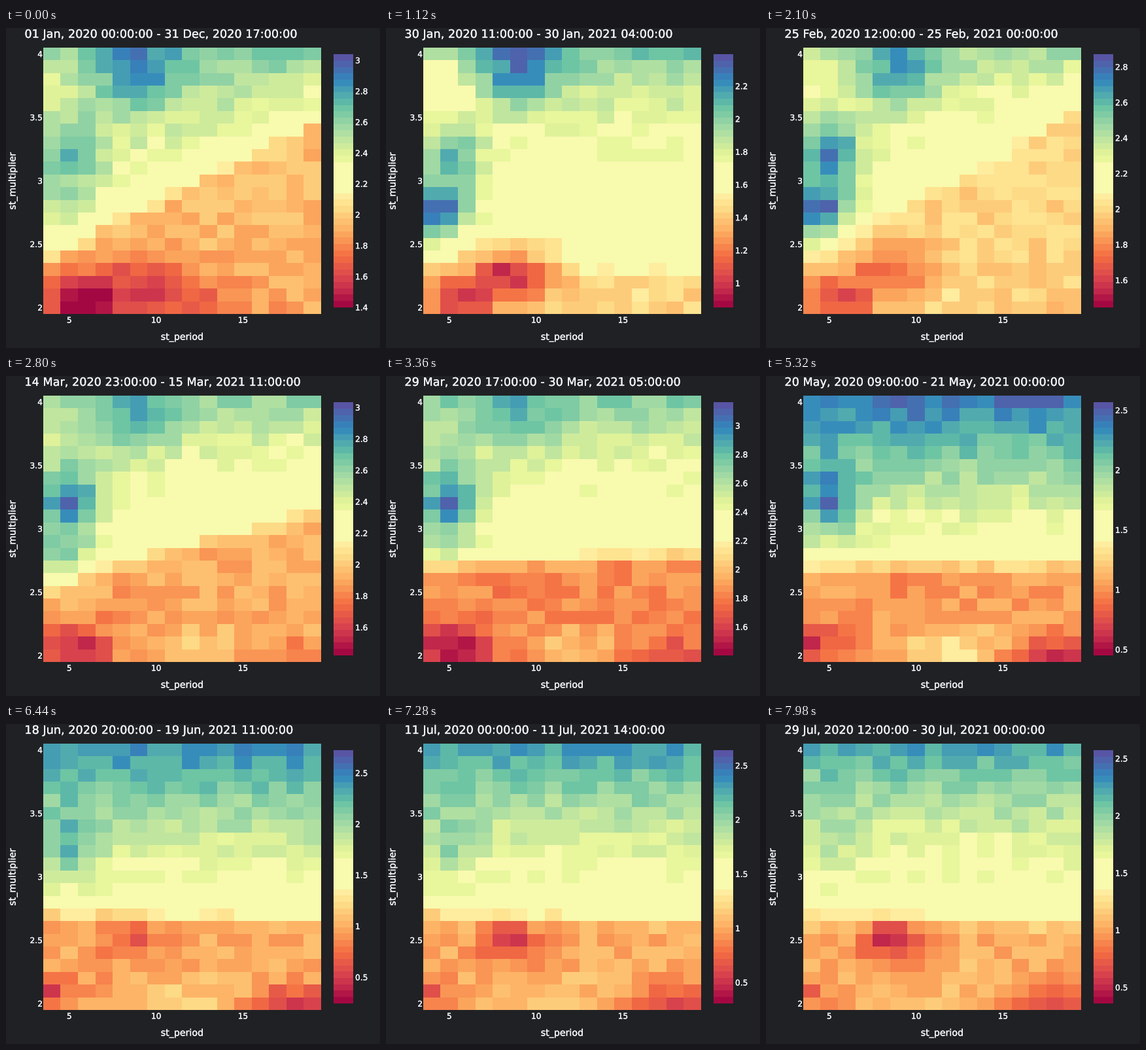
Animation of 572 by 489 pixels, one loop 8 s. Source, as a matplotlib script:

```python
import numpy as np
import matplotlib.pyplot as plt
from matplotlib.animation import FuncAnimation
from matplotlib.colors import ListedColormap
from matplotlib.patheffects import withStroke

W, H, DPI = 572, 489, 64
TICK, STEP_TICKS, FRAMES = 20, 7, 400   # a new window every 140 ms
BG, INK = '#202124', '#f2f5fa'
MONTHS = 'Jan Feb Mar Apr May Jun Jul Aug Sep Oct Nov Dec'.split()
plt.rcParams['font.family'] = 'DejaVu Sans'

# Key windows: first hour, last hour and colour range
STEPS = [0, 8, 15, 24, 38, 46, 57]
STARTS = ['2020-01-01T00', '2020-01-30T11', '2020-02-25T12', '2020-03-29T17',
          '2020-05-20T09', '2020-06-18T20', '2020-07-29T12']
ENDS = ['2020-12-31T17', '2021-01-30T04', '2021-02-25T00', '2021-03-30T05',
        '2021-05-21T00', '2021-06-19T11', '2021-07-30T00']
LOWS = [1.40, .853, 1.447, 1.402, .451, .244, .36]
HIGHS = [3.04, 2.395, 2.872, 3.164, 2.568, 2.724, 2.574]

# The front between gains (above) and losses (below)
FRONT_LEFT = [2.45, 2.4, 2.45, 2.75, 2.75, 2.75, 2.75]
FRONT_RIGHT = [3.5, 2.3, 3.55, 2.85, 2.75, 2.7, 2.65]
GAIN = [.26, .27, .2, .25, .42, .38, .34]
BEND = [1, 3, 1.5, 2, 1.2, 1.3, 1.5]
LOSS = [.17, .09, .12, .26, .22, .2, .19]

P, M = np.meshgrid(np.arange(4, 20), np.linspace(4, 2, 21))
rng = np.random.default_rng(12)
PHASE = rng.uniform(0, 2 * np.pi, P.shape)
DRIFT = rng.normal(0, .12, P.shape)


def at(step, values):
    return np.interp(step, STEPS, values)


def bell(x, centre, width):
    return np.exp(-((x - centre) / width) ** 2)


def bump(p, m, wide, tall, amp, peak, span):
    """A hill or hollow on the map that swells and fades around one step."""
    shape = amp * bell(P, p, wide) * bell(M, m, tall)
    return lambda step: shape * bell(step, peak, span)


BUMPS = [
    bump(9, 3.85, 2.2, .28, .22, 7, 20),
    bump(4, 3.75, 2.5, .35, -.2, 8, 10),
    bump(5, 3.2, 1.8, .3, .4, 23, 28),
    bump(4.5, 2.75, 1.7, .2, .48, 11, 9),
    bump(8.5, 2.3, 2.5, .22, -.33, 9, 8),
    bump(8.5, 2.5, 1.8, .18, -.22, 57, 15),
    bump(5.5, 2.05, 2, .18, -.28, 8, 25),
    bump(4, 2.1, 1, .14, -.2, 40, 22),
    bump(10, 2.05, 5, .25, -.2, 0, 6),
    bump(12, 2.05, 2.5, .18, .17, 32, 14),
    bump(18, 2, 2.2, .14, -.22, 57, 40),
]


def field(step):
    left, right = at(step, FRONT_LEFT), at(step, FRONT_RIGHT)
    front = left + (right - left) * (P - 4) / 15
    above = np.clip((M - front) / (4 - front), 0, 1)
    below = np.tanh(np.clip(front - M, 0, None) / .08)
    z = .5 + at(step, GAIN) * above ** at(step, BEND) - at(step, LOSS) * below
    z += sum(b(step) for b in BUMPS)
    z += .04 * np.sin(PHASE + DRIFT * step)
    return np.clip(z, 0, 1)


def hours(stamps):
    return [np.datetime64(s, 'h').astype(int) for s in stamps]


STARTS, ENDS = hours(STARTS), hours(ENDS)


def stamp(h):
    date, hour = str(np.datetime64(int(round(h)), 'h')).split('T')
    year, month, day = date.split('-')
    return f'{day} {MONTHS[int(month) - 1]}, {year} {hour}:00:00'


# Spectral scale in visible bands with a flat pale centre
bands = plt.get_cmap('Spectral')((np.arange(40) + .5) / 40)
bands[18:23, :3] = np.array([248, 250, 174]) / 255
CMAP = ListedColormap(bands)

fig = plt.figure(figsize=(W / DPI, H / DPI), dpi=DPI, facecolor=BG)
ax = fig.add_axes([0, 0, 1, 1])
BOLDER = [withStroke(linewidth=.3, foreground=INK)]


def label(x, y, text='', px=12.2, ha='left', **kw):
    return ax.text(x, y, text, fontsize=px * 72 / DPI, color=INK, ha=ha,
                   va='baseline', path_effects=BOLDER, **kw)


def picture(data, extent):
    return ax.imshow(data, cmap=CMAP, vmin=0, vmax=1, extent=extent,
                     aspect='auto', interpolation='nearest')


LEFT, RIGHT, TOP, BOTTOM = 57, 482, 30, 437
BAR_TOP, BAR_BOTTOM = 40, 427
heat = picture(field(0), (LEFT, RIGHT, BOTTOM, TOP))
picture(np.linspace(1, 0, 387)[:, None], (501, 531, BAR_BOTTOM, BAR_TOP))
ax.set(xlim=(0, W), ylim=(H, 0))
ax.axis('off')

cell_w, cell_h = (RIGHT - LEFT) / 16, (BOTTOM - TOP) / 21
for m in (4, 3.5, 3, 2.5, 2):
    label(56, TOP + cell_h * ((4 - m) * 10 + .5) + 4.5, f'{m:g}', ha='right')
for p in (5, 10, 15):
    label(LEFT + cell_w * (p - 3.5), 450.5, str(p), ha='center')
label(269.5, 476.5, 'st_period', 14.2, 'center')
label(14.5, 233.5, 'st_multiplier', 14.2, 'center',
      rotation=90, rotation_mode='anchor')
title = label(28.4, 15, px=17.65)
bar_labels = [label(534, 0) for _ in range(11)]


def update(frame):
    step = frame // STEP_TICKS
    heat.set_data(field(step))
    title.set_text(f'{stamp(at(step, STARTS))} - {stamp(at(step, ENDS))}')

    low, high = at(step, LOWS), at(step, HIGHS)
    gap = .5 if high - low > 1.9 else .2
    first = np.ceil(low / gap)
    for i, text in enumerate(bar_labels):
        v = gap * (first + i)
        y = BAR_BOTTOM - (v - low) / (high - low) * (BAR_BOTTOM - BAR_TOP)
        text.set_text(f'{v:.3g}' if v <= high else '')
        text.set_y(y + 4.5)
    return [heat, title, *bar_labels]


anim = FuncAnimation(fig, update, frames=FRAMES, interval=TICK,
                     init_func=lambda: update(0), repeat=True, repeat_delay=0)
plt.show()
```
